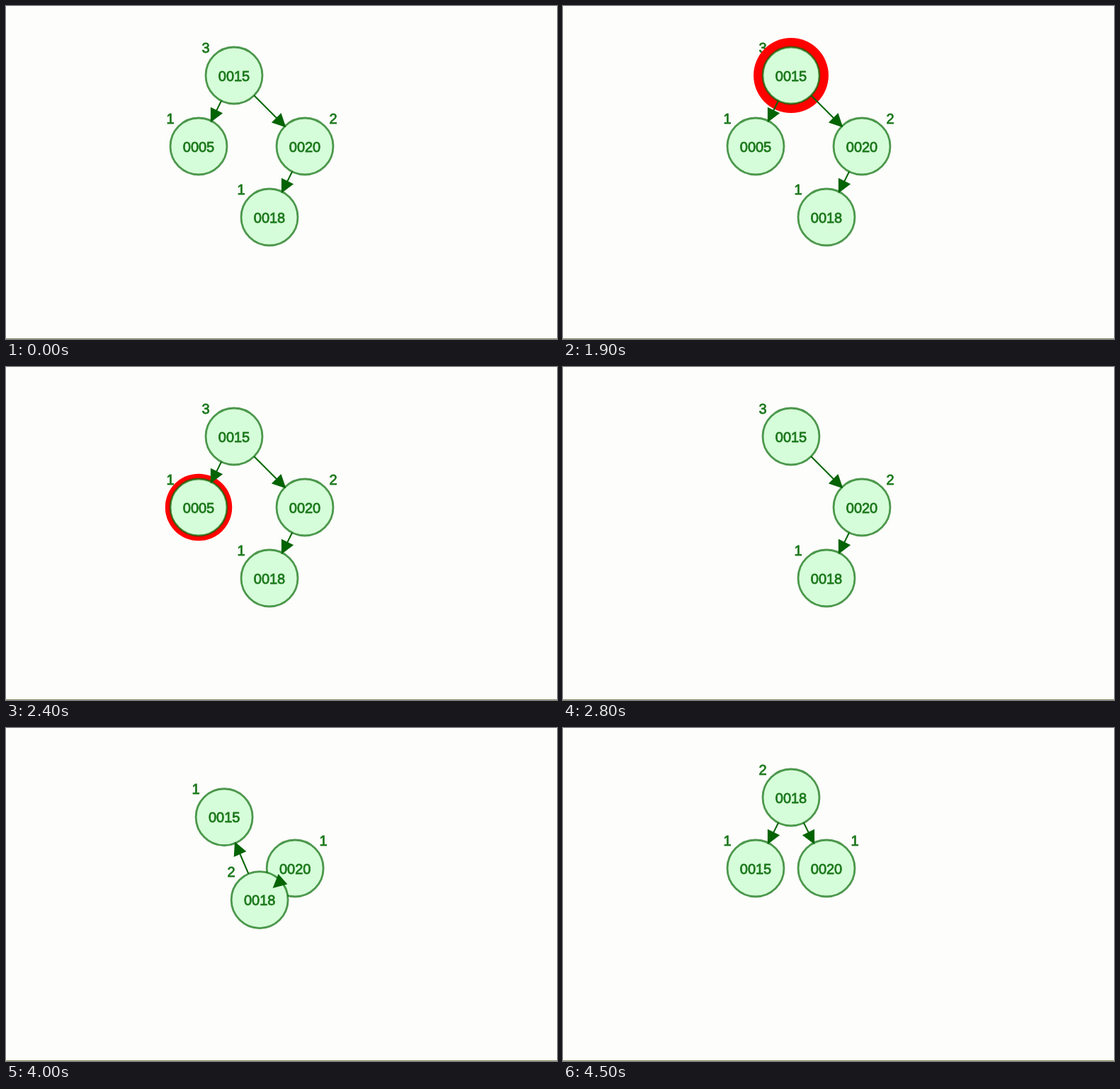
Animation of 778 by 470 pixels, one loop 5000 ms. Source, as an HTML page with a canvas:

```html
<!DOCTYPE html>
<html lang="en">
<head>
<meta charset="utf-8">
<title>AVL tree: deletion with double rotation</title>
<style>
  html, body { margin: 0; width: 100%; height: 100%; overflow: hidden; background: #fdfdfb; }
  body { box-sizing: border-box; border-bottom: 1px solid #858c64; }
  canvas { display: block; filter: blur(0.5px); }
</style>
</head>
<body>
<canvas id="stage" width="778" height="469"></canvas>
<script>
const stage = document.getElementById('stage'), ctx = stage.getContext('2d');
const LOOP = 5000, STEP = 100, R = 40;
const GREEN = '#046404', RED = '#ff0000';

// Start of each phase in ms
const T = { root: 1275, walk: 2025, leaf: 2390, remove: 2780, edges: 3525, rotate: 3896, done: 4271 };

const within = (t, a, b) => t >= a && t < b;
const clamp = v => Math.max(0, Math.min(1, v));
const lerp = (a, b, p) => a + (b - a) * p;

// Highlight thickness: triangle wave between 6.5 and 13.5
function pulse(t) {
  const u = (((t - 2355) % 840) + 840) % 840;
  return 6.5 + 7 * (1 - Math.abs(u - 420) / 420);
}

function circle(x, y, r) {
  ctx.beginPath();
  ctx.arc(x, y, r, 0, Math.PI * 2);
}

function write(text, x, y) {
  ctx.fillStyle = ctx.strokeStyle = '#1b781b';
  ctx.lineWidth = 0.8;
  ctx.fillText(text, x, y);
  ctx.strokeText(text, x, y);
}

function drawNode(n, ring) {
  write(n.height, n.x + n.side * 40, n.y - 38);
  if (ring) {
    circle(n.x, n.y, R + ring);
    ctx.fillStyle = RED;
    ctx.fill();
  }
  circle(n.x, n.y, R);
  ctx.fillStyle = '#d6fdd9';
  ctx.fill();
  ctx.strokeStyle = 'rgba(0, 104, 0, 0.68)';
  ctx.lineWidth = 2.8;
  ctx.stroke();
  write(n.key, n.x, n.y + 2);
}

function arrow(x1, y1, x2, y2, width, color) {
  const a = Math.atan2(y2 - y1, x2 - x1), c = Math.cos(a), s = Math.sin(a);
  const bx = x2 - 16 * c, by = y2 - 16 * s;
  ctx.strokeStyle = ctx.fillStyle = color;
  ctx.lineWidth = width;
  ctx.beginPath();
  ctx.moveTo(x1, y1);
  ctx.lineTo(x2, y2);
  ctx.stroke();
  ctx.beginPath();
  ctx.moveTo(x2, y2);
  ctx.lineTo(bx - 8 * s, by + 8 * c);
  ctx.lineTo(bx + 8 * s, by - 8 * c);
  ctx.closePath();
  ctx.fill();
  ctx.stroke();
}

function drawEdge(from, to, glow) {
  const a = Math.atan2(to.y - from.y, to.x - from.x);
  const dx = R * Math.cos(a), dy = R * Math.sin(a);
  const ends = [from.x + dx, from.y + dy, to.x - dx, to.y - dy];
  if (glow) arrow(...ends, glow, RED);
  arrow(...ends, 2, GREEN);
}

function draw(t) {
  const p = clamp((t - T.rotate) / (T.done - T.rotate));
  const turned = t >= T.rotate;
  const node = (key, x, y, toX, toY, side, before, after) => ({
    key, side, x: lerp(x, toX, p), y: lerp(y, toY, p), height: turned ? after : before
  });
  const n15 = node('0015', 322, 98, 272, 198, -1, '3', '1');
  const n5 = node('0005', 272, 198, 272, 198, -1, '1', '1');
  const n20 = node('0020', 422, 198, 372, 198, 1, '2', '1');
  const n18 = node('0018', 372, 298, 322, 98, -1, '1', '2');
  const hasLeaf = t < T.remove;
  const glow = within(t, T.edges, T.rotate) ? pulse(t) : 0;

  ctx.clearRect(0, 0, stage.width, stage.height);
  ctx.font = '20px "Liberation Sans", Arial, sans-serif';
  ctx.textAlign = 'center';
  ctx.textBaseline = 'middle';

  drawNode(n15, within(t, T.root, T.walk) ? pulse(t) : 0);
  if (hasLeaf) drawNode(n5, t >= T.leaf ? pulse(t) : 0);
  drawNode(n20);
  drawNode(n18);

  if (within(t, T.walk, T.leaf)) {
    const q = (t - T.walk) / (T.leaf - T.walk);
    circle(lerp(n15.x, n5.x, q), lerp(n15.y, n5.y, q), R);
    ctx.strokeStyle = '#007700';
    ctx.lineWidth = 8;
    ctx.stroke();
  }

  if (turned) {
    drawEdge(n18, n15);
    drawEdge(n18, n20);
  } else {
    if (hasLeaf) drawEdge(n15, n5);
    drawEdge(n15, n20, glow);
    drawEdge(n20, n18, glow);
  }
}

const start = performance.now();
function tick() {
  const t = (performance.now() - start) % LOOP;
  draw(Math.floor(t / STEP) * STEP);
  requestAnimationFrame(tick);
}
tick();
</script>
</body>
</html>
```
